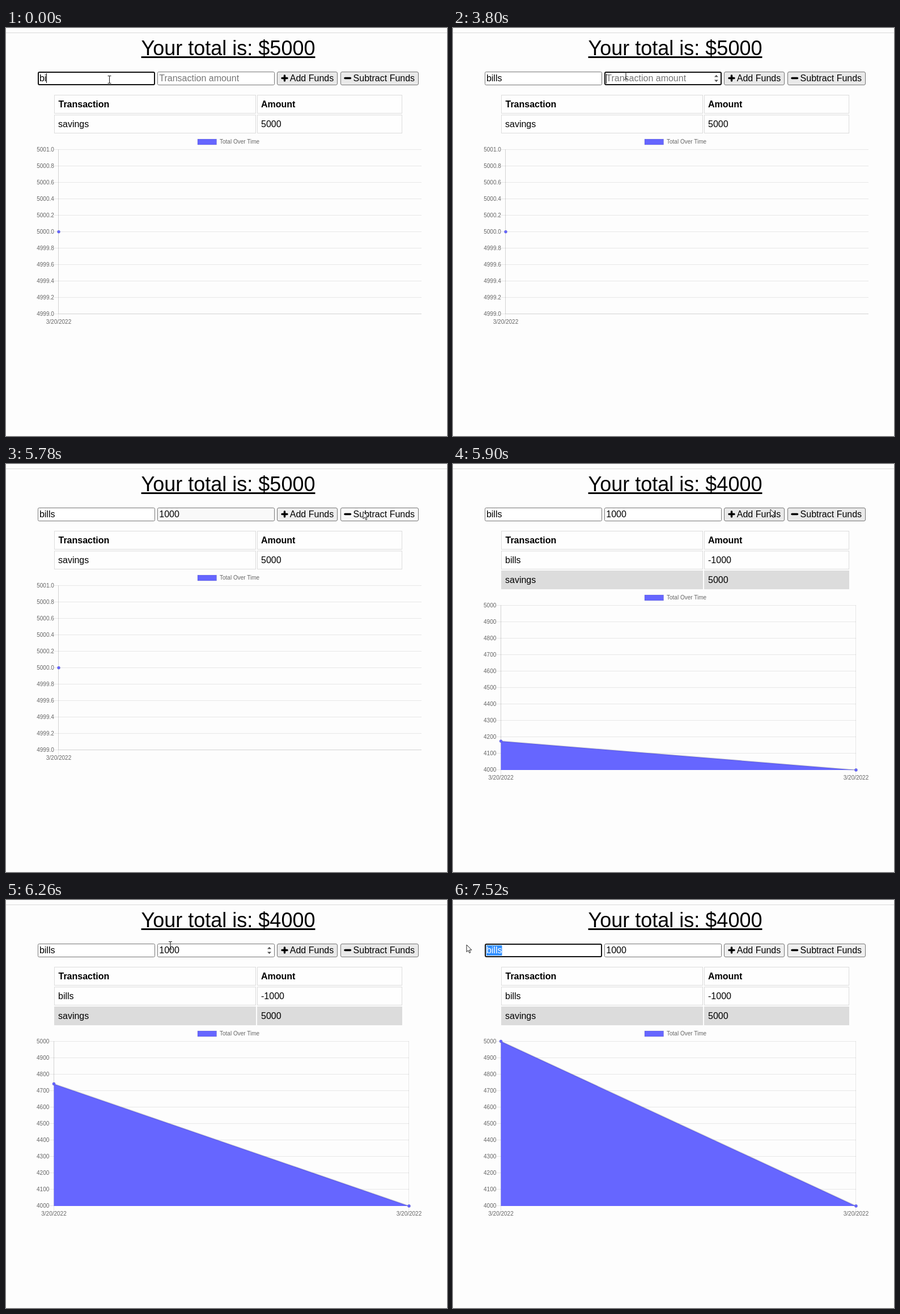
Recreate the animation shown at these times as an HTML page. Size 778 px wide and 720 px high, loop 8 s.

```html
<!DOCTYPE html>
<html lang="en">
<head>
<meta charset="utf-8">
<title>Budget tracker</title>
<style>
html, body { margin: 0; width: 100%; height: 100%; overflow: hidden; background: #fdfdfd; }
body, svg text { font-family: "Liberation Sans", Arial, sans-serif; }
svg { position: absolute; left: 0; top: 0; width: 100%; height: 100%; font-size: 16px; }
h1 { position: absolute; left: 6px; right: 0; top: 15px; margin: 0; text-align: center;
  font: 36px/41px "Liberation Sans", Arial, sans-serif; text-decoration: underline; color: #000; }
</style>
</head>
<body>
<h1 id="title"></h1>
<svg id="stage" viewBox="0 0 778 720"></svg>
<script>
const LOOP = 8000, CHART_START = 5853, CHART_TIME = 1000, SUBMIT = 5900;
const BLUE = '#6666ff', CELL_LINE = '#dcdcdc';

// [time, x, y, shape]; the pointer jumps from one place to the next
const POINTER = [
  [0, 182.5, 91, 'beam'],
  [1130, 200, 90, 'beam'], [1250, 245, 80, 'beam'], [1370, 285, 81, 'beam'],
  [1490, 302, 84, 'beam'], [1610, 305, 84, 'beam'],
  [5060, 320, 84, 'beam'], [5180, 380, 86, 'beam'], [5300, 450, 88, 'beam'],
  [5420, 530, 84, 'arrow'], [5540, 590, 84, 'arrow'], [5660, 625, 84, 'arrow'], [5780, 630, 84, 'arrow'],
  [5900, 560, 80, 'arrow'], [6020, 357, 76, 'beam'], [6140, 290, 80, 'beam'],
  [6270, 225, 86, 'beam'], [6380, 180, 92, 'beam'], [6520, 165, 93, 'beam'],
  [6640, 135, 92, 'beam'], [6760, 110, 91, 'beam'], [6880, 100, 90, 'beam'],
  [7400, 62, 88, 'beam'], [7520, 24, 79, 'arrow']
];
const NAME_TYPED = [[0, 'bi'], [120, 'bil'], [240, 'bill'], [360, 'bills']];
const AMOUNT_TYPED = [[0, ''], [3920, '1'], [4170, '10'], [4290, '100'], [4540, '1000']];
const FOCUS = [[0, 'name'], [1610, 'amount'], [5780, ''], [6880, 'name']];
const CARET = [[0, 1], [880, 0], [1370, 1], [2240, 0], [2780, 1], [3280, 0], [3800, 1], [5060, 0], [5660, 1], [7400, 0]];

const latest = (keys, t) => keys.filter(k => k[0] <= t).pop();
const valueAt = (keys, t) => latest(keys, t)[1];
const crisp = v => Math.floor(v) + .5;

const measure = document.createElement('canvas').getContext('2d');
measure.font = '16px "Liberation Sans", Arial, sans-serif';
const textWidth = s => measure.measureText(s).width;

const text = (x, y, s, attrs = '') => `<text x="${x}" y="${y}" ${attrs}>${s}</text>`;
const rect = (x, y, w, h, attrs) => `<rect x="${x}" y="${y}" width="${w}" height="${h}" ${attrs}/>`;
const path = (d, attrs) => `<path d="${d}" ${attrs}/>`;
const small = anchor => `font-size="10" fill="#666" text-anchor="${anchor}"`;

// A rectangle whose border lies inside the given outer box
const box = (x, y, w, h, border, attrs) =>
  rect(x + border / 2, y + border / 2, w - border, h - border, `stroke-width="${border}" ${attrs}`);

function input(x, textX, value, { focused, caret, selected, placeholder = '', spinner, fill = '#fff' }) {
  const end = textX + textWidth(value);
  let out = box(x, 77, 207, 24, focused ? 2 : 1, `rx="2" fill="${fill}" stroke="${focused ? '#101010' : '#767676'}"`);
  if (selected) out += rect(textX, 80, end - textX, 18, 'fill="#3390ff"');
  out += value
    ? text(textX, 94, value, `fill="${selected ? '#fff' : '#000'}"`)
    : text(textX, 94, placeholder, 'fill="#757575"');
  if (caret) out += rect(Math.floor(end), value ? 80 : 81, 1, 17, 'fill="#000"');
  if (spinner) out += path(`M${x + 194} 86.5l3.5-3.7 3.5 3.7zM${x + 194} 91.5l3.5 3.7 3.5-3.7z`, 'fill="#505050"');
  return out;
}

function button(x, w, label, labelX, icon, fill) {
  return box(x, 77, w, 24, 1, `rx="2.5" fill="${fill}" stroke="#767676"`) +
    path(icon, 'stroke="#000" stroke-width="3.4" stroke-linecap="round"') +
    text(labelX, 94, label);
}

function row(y, left, right, { bold, shaded } = {}) {
  const look = `fill="${shaded ? '#dcdcdc' : '#fefefe'}" stroke="${CELL_LINE}"`;
  const weight = bold ? 'font-weight="bold"' : '';
  return box(85, y, 356, 33, 1, look) + box(443, y, 256, 33, 1, look) +
    text(bold ? 92.5 : 92, y + 22, left, weight) + text(450, y + 22, right, weight);
}

function chart({ x0, x1, top, ticks, dates, points, fill }) {
  const step = 29.06, bottom = top + step * 10, tick = 8.5;
  const line = (xa, ya, xb, yb) => path(`M${xa} ${ya}L${xb} ${yb}`, 'stroke="#000" stroke-opacity=".085" fill="none"');
  let out = rect(338, top - 18.3, 33.5, 10, `fill="${BLUE}" stroke="#000" stroke-opacity=".1"`) +
    text(377, top - 10.2, 'Total Over Time', small('start'));
  ticks.forEach((label, i) => {
    const y = crisp(top + i * step);
    out += line(x0 - tick, y, x1, y) + text(x0 - tick + .3, y + 3, label, small('end'));
  });
  dates.forEach(x => {
    out += line(crisp(x - .5), top, crisp(x - .5), bottom + tick) + text(x, bottom + 17.3, '3/20/2022', small('middle'));
  });
  out += line(crisp(x0 - .5), top, crisp(x0 - .5), bottom) + line(x0, crisp(bottom), x1, crisp(bottom));
  const at = points.map(([x, v]) => [x, bottom - v * step * 10]);
  if (fill) {
    const edge = 'M' + at.map(p => p.join(' ')).join('L');
    out += path(`${edge}L${x1} ${bottom}L${x0} ${bottom}z`, `fill="${BLUE}"`) +
      path(edge, 'fill="none" stroke="#000" stroke-opacity=".1" stroke-width="2.5"');
  }
  at.forEach(([x, y]) => {
    out += `<circle cx="${x}" cy="${y}" r="2.6" fill="${BLUE}" stroke="#000" stroke-opacity=".1"/>`;
  });
  return out;
}

function pointer(x, y, shape) {
  if (shape === 'beam') {
    return path(`M${x - 3} ${y - 6.5}h2.2l.8 .8 .8-.8h2.2M${x} ${y - 6}v12.5M${x - 3} ${y + 6.5}h2.2l.8-.8 .8 .8h2.2`,
      'fill="none" stroke="#222" stroke-width="1.1"');
  }
  return path(`M${x} ${y}v12.6l2.9-2.7 2 4.6 2-.9-2-4.4h4z`, 'fill="#fff" stroke="#222" stroke-width="1"');
}

const range = (n, f) => Array.from({ length: n }, (_, i) => f(i));
const before = {
  x0: 93, x1: 733, top: 214.3, dates: [93], points: [[93, .5]],
  ticks: range(11, i => (5001 - i * .2).toFixed(1))
};
const after = {
  x0: 84.5, x1: 711, top: 249.3, dates: [84.5, 711], fill: true,
  ticks: range(11, i => 5000 - i * 100)
};

function draw(t) {
  const [frameTime, px, py, shape] = latest(POINTER, t);
  const focus = valueAt(FOCUS, t), caret = valueAt(CARET, t);
  const submitted = t >= SUBMIT, pressed = t >= 5780 && !submitted;
  const overAmount = px > 267 && px < 474 && shape === 'beam';
  const buttonFill = pressed || t >= 7400 ? '#efefef' : '#e9e9e9';

  let out = path('M0 8.5H778', 'stroke="#d9d9d9"');
  out += input(56, 58.9, valueAt(NAME_TYPED, t), {
    focused: focus === 'name', caret: focus === 'name' && caret, selected: t >= 7400
  });
  out += input(267, 270.3, valueAt(AMOUNT_TYPED, t), {
    focused: focus === 'amount', caret: focus === 'amount' && caret, placeholder: 'Transaction amount',
    spinner: focus === 'amount' || overAmount, fill: pressed ? '#f9f9f9' : '#fff'
  });
  out += button(478, 107, 'Add Funds', 500.8, 'M487 88.5h9M491.5 84v9', buttonFill);
  out += button(590, 138, 'Subtract Funds', 612.6, 'M598 88.5h9.5', pressed ? '#f7f7f7' : buttonFill);

  out += row(118, 'Transaction', 'Amount', { bold: true });
  if (submitted) {
    const p = Math.min(1, (frameTime - CHART_START) / CHART_TIME);
    const rise = 1 - (1 - p) ** 4;
    out += row(153, 'bills', '-1000') + row(188, 'savings', '5000', { shaded: true });
    out += chart({ ...after, points: [[84.5, rise], [711, 0]] });
  } else {
    out += row(153, 'savings', '5000') + chart(before);
  }
  return out + pointer(px, py, shape);
}

const stage = document.getElementById('stage'), title = document.getElementById('title');
let shown = '';
function tick() {
  const t = performance.now() % LOOP;
  const picture = draw(t);
  if (picture !== shown) {
    stage.innerHTML = shown = picture;
    title.textContent = `Your total is: $${t >= SUBMIT ? 4000 : 5000}`;
  }
  requestAnimationFrame(tick);
}
tick();
</script>
</body>
</html>
```
